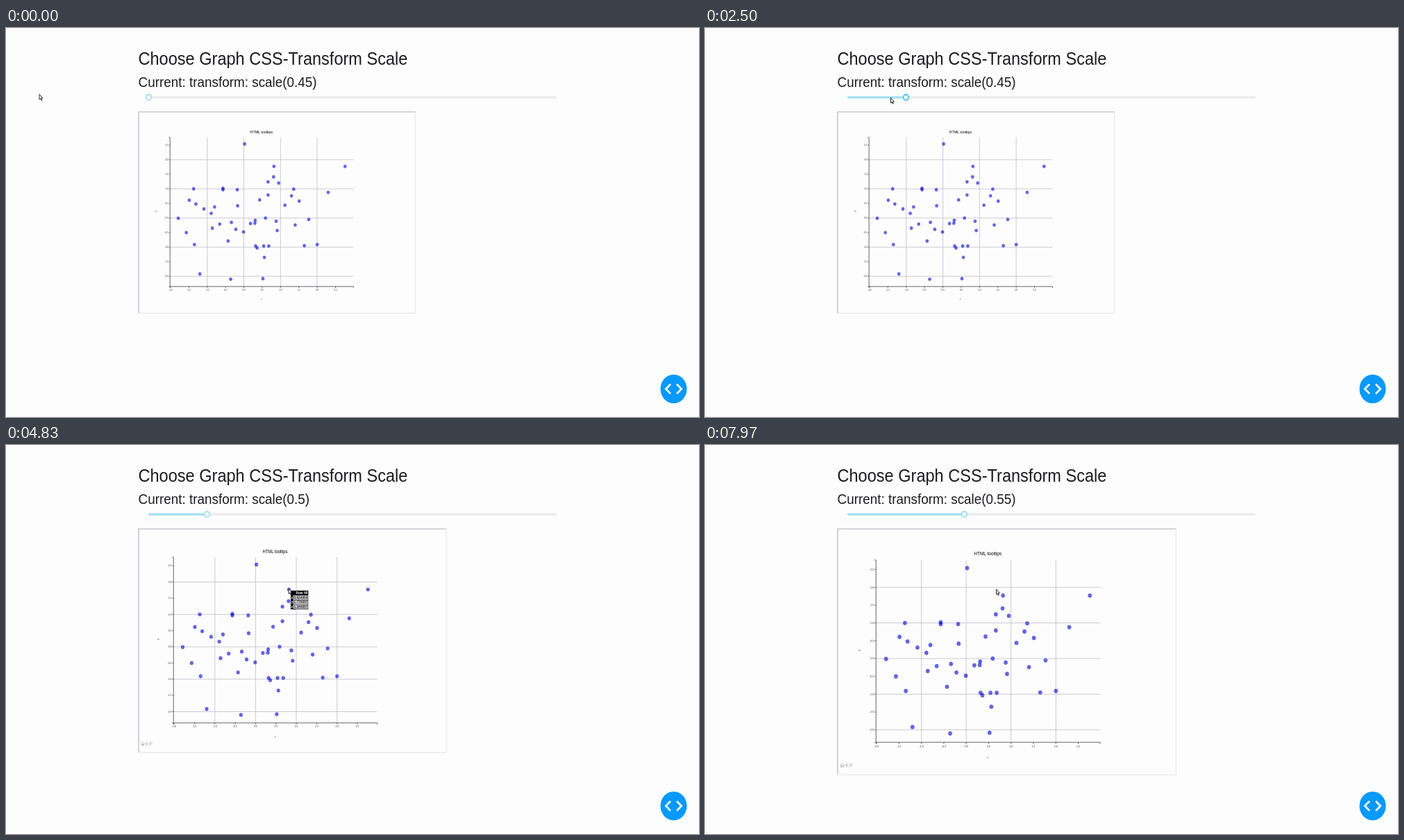
Write an HTML page that moves like this. It is 998x561 px and loops after 8 s.

```html
<!DOCTYPE html>
<html lang="en">
<head>
<meta charset="utf-8">
<style>
  html, body { margin: 0; width: 100%; height: 100%; overflow: hidden; background: #fdfdfd; }
  svg { display: block; width: 100%; height: 100%; font-family: "Liberation Sans", Arial, sans-serif; }
  path { fill: none; vector-effect: non-scaling-stroke; }
  .grid { stroke: #bdbdca; stroke-width: .8; }
  .axis { stroke: #55555c; stroke-width: .9; }
  .small { font-size: 6.6px; fill: #222; }
  .mid { text-anchor: middle; }
  .end { text-anchor: end; }
  .dots { fill: rgba(0, 0, 220, .6); stroke: rgba(0, 0, 130, .3); stroke-width: 1; }
  #tools { stroke: #a4a4ac; stroke-width: .7; }
  #tip { font-size: 9.6px; }
</style>
</head>
<body>
<!-- The recording is slightly taller than its true proportions, hence the free aspect ratio. -->
<svg viewBox="0 0 998 514" preserveAspectRatio="none">
  <g fill="#1c1c1f">
    <text x="190.5" y="49" font-size="23.57">Choose Graph CSS-Transform Scale</text>
    <text id="label" x="190.5" y="77.9" font-size="18.9"></text>
  </g>
  <rect x="205" y="90.3" width="588" height="2.7" rx="1.35" fill="#e9e9e9"/>
  <rect id="track" x="205" y="90.3" height="2.7" rx="1.35" fill="#9fe0f3"/>
  <circle id="handle" cy="91.6" r="3.7" fill="#fff"/>
  <g id="graph"></g>
  <circle cx="961.5" cy="476.9" r="19" fill="#0799fb"/>
  <path d="M957 470.6L950.3 476.9L957 483.2M966 470.6L972.7 476.9L966 483.2" stroke="#fff" stroke-width="2.7"/>
  <g id="cursor">
    <path d="M0 0V7L1.6 5.6L2.8 8.2L3.9 7.7L2.8 5.2H4.8Z" style="fill:#f4f4f4" stroke="#222" stroke-width=".95"/>
  </g>
</svg>
<script>
const LOOP = 8000, ASPECT = 561 / 514;
const $ = id => document.getElementById(id);

// Data units to unscaled graph units
const px = x => 336.8 + 117.3 * x;
const py = y => 311.5 - 85.6 * y;
const LEFT = px(-2.015), RIGHT = px(2.99), TOP = py(2.766), BOTTOM = py(-2.35);

const points = `.02 2.54,2.76 1.77,.82 1.77,.81 1.41,.66 1.24,.95 1.2,-1.37 1,-.57 1.02,-.57 .97,-.18 .97,
1.36 .99,2.3 .88,1.3 .76,.66 .79,-1.49 .61,.43 .62,1.51 .58,-1.31 .48,-.17 .42,-.8 .38,1.12 .44,-1.09 .31,
-.89 .16,-1.79 -.01,.59 0,1.77 -.05,.31 -.08,.3 -.18,.18 -.19,-.34 -.15,-.66 -.21,.88 -.11,1.4 -.24,-.86 -.35,
-.22 -.39,-.01 -.48,.91 -.43,-1.57 -.5,-.43 -.79,-1.35 -.91,.32 -.96,.36 -1.03,.54 -.96,.68 -.96,1.65 -.95,
2 -.91,.56 -1.35,-1.2 -1.92,-.36 -2.1,.52 -2.08`.split(',').map(p => p.trim().split(' ').map(Number));

const line = (d, cls) => `<path class="${cls}" d="${d}"/>`;
const text = (x, y, s, cls) => `<text x="${x}" y="${y}" class="${cls}">${s}</text>`;

function buildGraph() {
  let out = line('M886 0V591H0', '" stroke="#e6e6ec') + line('M0 591V0H886', '" stroke="#aeaeb8" stroke-width="1.1');
  for (let i = -2; i <= 2; i++) {
    if (i > -2) out += line(`M${px(i)} ${TOP}V${BOTTOM}`, 'grid');
    out += line(`M${LEFT} ${py(i)}H${RIGHT}`, 'grid');
  }
  for (let v = -2; v <= 2.5; v += .5) {
    out += line(`M${px(v)} ${BOTTOM}v4M${LEFT} ${py(v)}h-4`, 'axis');
    out += text(px(v), BOTTOM + 12, v.toFixed(1), 'small mid');
    out += text(LEFT - 6, py(v) + 2.3, v.toFixed(1), 'small end');
  }
  out += line(`M${LEFT - 4} ${TOP}h4V${BOTTOM}h-4M${LEFT} ${BOTTOM + 4}v-4H${RIGHT}v4`, 'axis');
  out += '<g class="dots">' + points.map(([x, y]) => `<circle cx="${px(x)}" cy="${py(y)}" r="4.9"/>`).join('') + '</g>';
  out += '<text x="393" y="64" font-size="11.8" class="mid">HTML tooltips</text>';
  out += text(393, 551.5, 'x', 'small mid');
  out += '<text transform="translate(58 291.5) rotate(-90)" class="small mid">y</text>';
  // Toolbar: home, move, zoom
  out += `<g id="tools">${line('M7 0L12 -5L17 0M8.5 -1V4H11V1H13V4H15.5V-1', '')}
    ${line('M19 0H28M23.5 -5V5', '')}<path d="M32.5 1L30 4.5M32 -1.5a3 3 0 1 0 6 0a3 3 0 1 0 -6 0"/></g>`;
  // Tooltip table
  out += '<g id="tip"><rect x="438" y="163" width="50.5" height="49.5"/>';
  out += '<text x="486.5" y="172.5" font-weight="bold" fill="#fff" class="end">Row 48</text>';
  [['x', '0.824954'], ['y', '1.770007'], ['z', '1.349957']].forEach(([name, value], i) => {
    const y = 175.5 + 12.2 * i;
    out += `<rect x="445" y="${y}" width="42.5" height="11.4" fill="#c4c4c6"/>`;
    out += `<text x="439" y="${y + 9}" font-weight="bold" fill="#fff">${name}</text>`;
    out += text(486.8, y + 9.2, value, 'end');
  });
  return out + '</g>';
}
$('graph').innerHTML = buildGraph();

// Pointer path: time, x, y
const route = [
  [30, 48, 95.5], [830, 215.5, 96], [1150, 215.5, 96], [1550, 205, 97.5], [1750, 205, 98],
  [2500, 267.5, 100.5], [2700, 267.5, 100.5], [3330, 342.5, 152.5], [4350, 407, 207], [4850, 407, 207],
  [5170, 314, 118], [5380, 289, 98], [5480, 289, 98], [6130, 351.5, 102.5], [6500, 351.5, 102.5],
  [7330, 379, 173], [7900, 419.5, 208]
];

function pointerAt(t) {
  const i = route.findIndex(k => k[0] > t);
  if (i === 0) return route[0].slice(1);
  if (i < 0) return route[route.length - 1].slice(1);
  const [a, b] = [route[i - 1], route[i]];
  const f = (t - a[0]) / (b[0] - a[0]);
  return [1, 2].map(n => a[n] + (b[n] - a[n]) * f);
}

const ramp = (t, start, end) => Math.min(1, Math.max(0, (t - start) / (end - start)));
const within = (t, a, b) => t >= a && t < b;

function draw(t) {
  const step = t < 2250 ? 0 : t < 5900 ? 1 : 2;
  const scale = t < 2820 ? .45 : t < 6620 ? .5 : .55;
  const active = within(t, 1600, 2760) || within(t, 5380, 6560);
  const [x, y] = pointerAt(t);

  $('label').textContent = `Current: transform: scale(${scale})`;
  $('track').setAttribute('width', 84 * step);
  $('handle').setAttribute('cx', 205.4 + 84 * step);
  $('handle').setAttribute('stroke', active ? '#4fc4f2' : '#8ad8f2');
  $('handle').setAttribute('stroke-width', active ? 1.9 : 1.4);
  $('graph').setAttribute('transform', `translate(191 110.9) scale(${scale})`);

  const shown = ramp(t, 3050, 3620) - ramp(t, 5180, 5600) + ramp(t, 6750, 7290);
  $('tools').setAttribute('transform', `translate(0 ${585 - 17 * shown})`);
  $('tools').setAttribute('opacity', shown);
  $('tip').setAttribute('visibility', within(t, 4370, 4890) ? 'visible' : 'hidden');
  $('cursor').setAttribute('transform', `translate(${x} ${y / ASPECT})`);
}

function tick() {
  draw(performance.now() % LOOP);
  requestAnimationFrame(tick);
}
tick();
</script>
</body>
</html>
```
